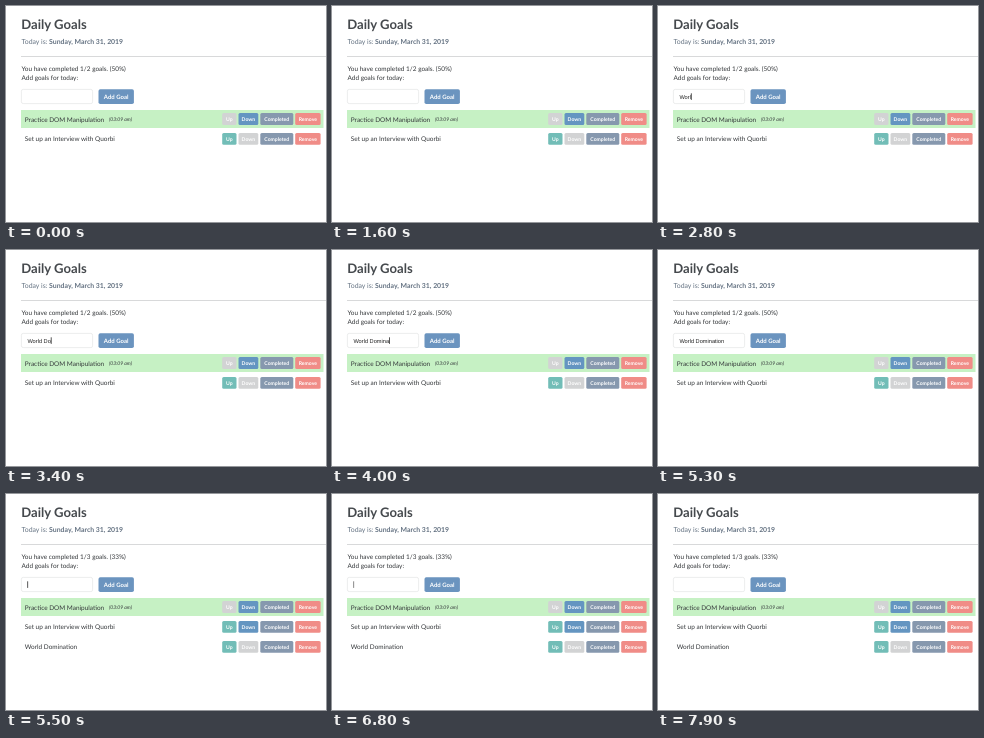
Animation, 320 px wide and 216 px high, one loop 8 s. Source, as an HTML page:

```html
<!DOCTYPE html>
<html lang="en">
<head>
<meta charset="utf-8">
<title>Daily Goals</title>
<style>
  html, body { margin: 0; width: 100%; height: 100%; overflow: hidden; background: #fff; }
  svg { display: block; width: 100%; height: 100%; }
  text { font: 6.45px Lato, sans-serif; fill: #34373a; text-rendering: geometricPrecision; white-space: pre; }
  .title { font-size: 13.1px; font-weight: 700; fill: #45494d; }
  .date { font-size: 6.9px; fill: #647282; }
  .bold { font-weight: 700; }
  .time { font-size: 5px; font-style: italic; }
  .button { font-size: 5.1px; font-weight: 700; fill: #fff; text-anchor: middle; }
  .add { font-size: 6px; }
  .field { font: 5.65px "Liberation Sans", Arial, sans-serif; fill: #222; }
</style>
</head>
<body>
<svg id="stage" viewBox="0 0 320 216">
  <rect width="320" height="216" fill="#fff"/>
  <text class="title" x="15.3" y="22.6">Daily Goals</text>
  <text class="date" x="15.5" y="38.4">Today is: <tspan class="bold">Sunday, March 31, 2019</tspan></text>
  <rect x="15" y="50" width="305" height="0.8" fill="#cfd0d1"/>
  <text id="summary" x="15.5" y="64.8"></text>
  <text x="15.5" y="74.4">Add goals for today:</text>
  <rect x="15.4" y="83.4" width="71.2" height="14.2" rx="1.8" fill="#fff" stroke="#e4e5e6" stroke-width="0.7"/>
  <text id="typed" class="field" x="21.4" y="92.7"></text>
  <rect id="caret" y="87.3" width="0.7" height="6.6" fill="#111"/>
  <rect x="92.5" y="83.2" width="35.4" height="14.8" rx="1.8" fill="#6b94bf"/>
  <text class="button add" x="110.2" y="92.8">Add Goal</text>
  <rect x="15" y="104" width="302.5" height="18" fill="#c6f1c4"/>
  <text class="time" x="103" y="115">(03:09 am)</text>
  <g id="rows"></g>
</svg>
<script>
const LOOP = 8000;
const STEP = 100;
const SUBMIT = 5400;
const GOAL = "World Domination";
const KEY_TIMES = [2400, 2600, 2700, 2800, 2900, 3000, 3300, 3400,
                   3500, 3600, 3800, 4000, 4100, 4200, 4300, 4400];
const COLORS = { off: "#d2d3d4", up: "#72bdb7", down: "#6495c1", done: "#8698ae", remove: "#f08c87" };

const byId = id => document.getElementById(id);
const [summary, typed, caret, rows] = ["summary", "typed", "caret", "rows"].map(byId);

function add(parent, tag, attributes, content = "") {
  const node = document.createElementNS("http://www.w3.org/2000/svg", tag);
  for (const name in attributes) node.setAttribute(name, attributes[name]);
  node.textContent = content;
  parent.append(node);
  return node;
}

function addButton(row, label, x, width, y, fill) {
  const box = add(row, "rect", { x, y, width, height: 11.8, rx: 1.5, fill });
  add(row, "text", { class: "button", x: x + width / 2, y: y + 7.7 }, label);
  return box;
}

function addRow(name, y, upColor, downColor) {
  const row = add(rows, "g", {});
  add(row, "text", { x: 18.8, y: y + 8.4 }, name);
  addButton(row, "Up", 216.2, 14.3, y, upColor);
  const down = addButton(row, "Down", 232.5, 19.8, y, downColor);
  addButton(row, "Completed", 254.3, 33, y, COLORS.done);
  addButton(row, "Remove", 289.2, 25.4, y, COLORS.remove);
  return { row, down };
}

addRow("Practice DOM Manipulation", 107.1, COLORS.off, COLORS.down);
const second = addRow("Set up an Interview with Quorbi", 127, COLORS.up, COLORS.off);
const third = addRow(GOAL, 147, COLORS.up, COLORS.off);

// The caret fades in and out once per second, and stays lit while typing.
function caretOpacity(time) {
  if (time < 2100) {
    const phase = (time + 900) % 1000;
    return phase < 100 ? 0.5 : phase < 500 ? 1 : 0;
  }
  if (time < 4700) return 1;
  if (time < SUBMIT) return time < 4800 ? 0.5 : 0;
  if (time < 5800) return 1;
  const phase = (time - 5800) % 1000;
  return phase < 100 ? 0.7 : phase < 500 ? 0 : phase < 600 ? 0.5 : 1;
}

function draw(time) {
  const added = time >= SUBMIT;
  const count = added ? 0 : KEY_TIMES.filter(key => key <= time).length;
  typed.textContent = GOAL.slice(0, count);
  summary.textContent = `You have completed ${added ? "1/3 goals. (33%)" : "1/2 goals. (50%)"}`;
  second.down.setAttribute("fill", added ? COLORS.down : COLORS.off);
  third.row.setAttribute("visibility", added ? "visible" : "hidden");
  caret.setAttribute("x", 21.4 + (count ? typed.getComputedTextLength() : 0));
  caret.setAttribute("opacity", caretOpacity(time));
}

const start = performance.now();
function tick() {
  const elapsed = Math.max(0, performance.now() - start) % LOOP;
  draw(Math.floor(elapsed / STEP) * STEP);
  requestAnimationFrame(tick);
}
tick();
</script>
</body>
</html>
```
